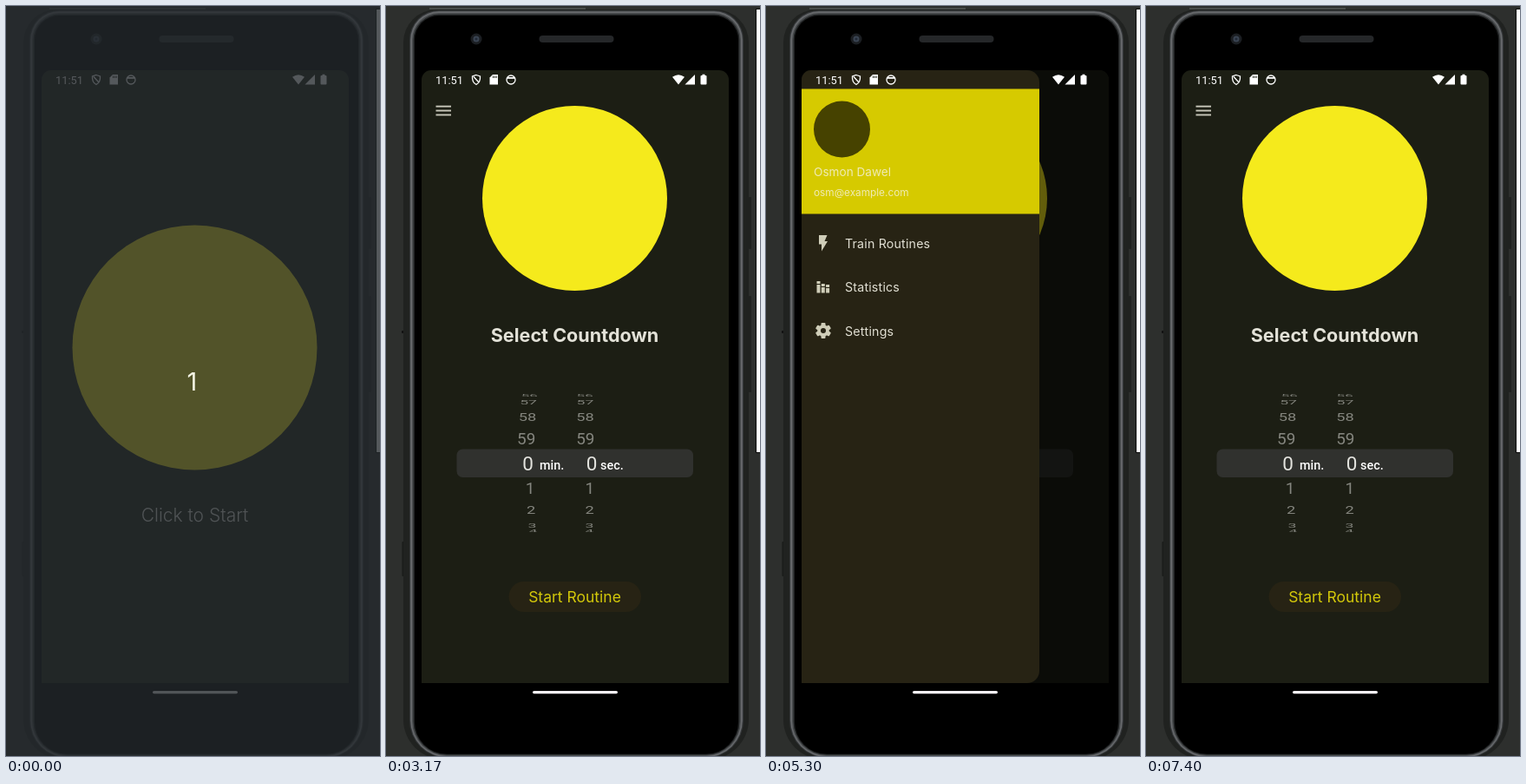
These frames come from a looping animation (431 px wide and 864 px high, 8000 ms). An HTML page with a canvas:

```html
<!DOCTYPE html>
<html lang="en">
<head>
<meta charset="utf-8">
<title>Countdown app</title>
<style>
  html, body { margin: 0; width: 100%; height: 100%; overflow: hidden; background: #2d2f2d; }
  canvas { display: block; width: 431px; height: 864px; }
</style>
</head>
<body>
<canvas id="stage" width="431" height="864"></canvas>
<script>
const ctx = document.getElementById('stage').getContext('2d');
const LOOP = 8000;
const SCREEN = { x: 41, y: 74, w: 354, h: 706 };
const DRAWER_W = 274;
const BG = '#1c1e14', SURFACE = '#272314', LOGO = '#f5ea1c', ICON = '#cfcdb8';

const mix = (a, b, k) => a + (b - a) * k;
const clamp = v => Math.max(0, Math.min(1, v));
const easeOut = (k, power) => 1 - Math.pow(1 - k, power);

// Progress from 0 to 1 in a fixed number of pictures.
function stepped(t, start, end, count) {
  const k = clamp((t - start) / (end - start));
  return Math.floor(k * (count - 1) + 1e-6) / (count - 1);
}

function rect(x, y, w, h, color) {
  ctx.fillStyle = color;
  ctx.fillRect(x, y, w, h);
}

function round(x, y, w, h, r, fill) {
  ctx.beginPath();
  ctx.roundRect(x, y, w, h, r);
  ctx.fillStyle = fill;
  ctx.fill();
}

function disc(x, y, r, color) {
  ctx.beginPath();
  ctx.arc(x, y, r, 0, Math.PI * 2);
  ctx.fillStyle = color;
  ctx.fill();
}

function poly(color, ...points) {
  ctx.beginPath();
  for (let i = 0; i < points.length; i += 2) ctx.lineTo(points[i], points[i + 1]);
  ctx.closePath();
  ctx.fillStyle = color;
  ctx.fill();
}

function label(text, x, y, font, color, align = 'left', spacing = 0) {
  ctx.font = font;
  ctx.fillStyle = color;
  ctx.textAlign = align;
  ctx.letterSpacing = spacing + 'px';
  ctx.fillText(text, x, y);
}

const inter = (size, weight = 400) => `${weight} ${size}px Inter, sans-serif`;
const roboto = (size, weight = 400) => `${weight} ${size}px Roboto, sans-serif`;

// One layer of the metal rim, measured inwards from its outer edge.
function rim(inset, color) {
  const top = Math.max(0, 34 - inset), bottom = 43 - inset;
  round(27 + inset, 5 + inset, 385 - 2 * inset, 861 - 1.7 * inset,
    [top, top, bottom, bottom], color);
}

function drawPhone() {
  rect(0, 0, 431, 864, '#2d2f2d');
  rect(50, 2, 180, 2, '#4a4d4b');

  // Side buttons
  round(18, 374, 3, 3, 1, '#111');
  round(18.5, 617, 3, 40, 1, '#1a1c1a');
  round(418, 220, 3, 60, 1, '#202220');
  round(418, 334, 3, 111, 1, '#202220');

  round(20, 4, 398, 864, [38, 38, 46, 46], '#202220');
  rim(0, '#35383a');
  rim(1.2, '#67696c');
  rim(3, '#494c4e');
  rim(4.5, '#222425');
  rim(6, '#000');

  disc(104, 38, 6.5, '#1b1e22');
  disc(104, 38, 3.5, '#3a4452');
  disc(104, 38, 1.5, '#222a36');
  round(176.5, 34, 86, 8, 4, '#252729');

  round(169, 789, 98, 3.2, 1.6, '#f4f0f4');

  // Neighbouring window
  rect(426, 3, 5, 512, '#0b0c0b');
  rect(427, 4, 4, 510, '#fff');
}

function drawStatusBar() {
  label('11:51', 57, 90, roboto(12.8), '#fff');
  ctx.strokeStyle = '#fff';
  ctx.lineWidth = 1.3;

  // Shield
  ctx.beginPath();
  ctx.moveTo(104, 79.5);
  ctx.lineTo(108.5, 81);
  ctx.quadraticCurveTo(109, 88, 104, 90.5);
  ctx.quadraticCurveTo(99, 88, 99.5, 81);
  ctx.closePath();
  ctx.moveTo(101, 81.5);
  ctx.lineTo(107, 88);
  ctx.stroke();

  // Memory card
  poly('#fff', 123, 79, 129, 79, 129, 90.5, 119.5, 90.5, 119.5, 82.5);
  for (let i = 0; i < 3; i++) rect(123 + i * 1.9, 80.5, 0.9, 2.5, BG);

  // Round notice
  ctx.beginPath();
  ctx.arc(144, 85, 5, 0, Math.PI * 2);
  ctx.stroke();
  rect(140, 82, 8, 1.8, '#fff');

  // Wi-Fi, signal, battery
  ctx.beginPath();
  ctx.moveTo(337, 90.5);
  ctx.lineTo(330, 81.8);
  ctx.quadraticCurveTo(337, 76.5, 344, 81.8);
  ctx.closePath();
  ctx.fillStyle = '#fff';
  ctx.fill();
  poly('#fff', 356, 79, 356, 90.5, 344.5, 90.5);
  round(362.5, 80, 7, 10.5, 1, '#fff');
  rect(364.5, 78.7, 3, 2, '#fff');
}

function drawSplash() {
  disc(217.5, 393.5, 141, LOGO);
  label('Click to Start', 217.5, 594, inter(21, 300), '#e8e8e2', 'center');
}

// Digits lie on a cylinder.
function drawWheel(x2, x0, x1, drift) {
  for (let i = -4; i <= 4; i++) {
    const n = Math.abs(i), angle = i * 0.375;
    const x = i === 0 ? x0 : i < 0 ? x2 + drift * n : x1 + drift * n;
    ctx.save();
    ctx.translate(x, 527 + 78.5 * Math.sin(angle));
    ctx.scale(1, Math.max(0.17, Math.cos(angle)));
    const size = i === 0 ? 22.5 : 19.5 - n * 0.6;
    label(String((i + 60) % 60), 0, size * 0.36, roboto(size),
      i === 0 ? '#e4e4df' : '#85867f', 'center');
    ctx.restore();
  }
}

function drawHome(k) {
  const scale = mix(0.986, 1, k);
  ctx.save();
  ctx.translate(217.5, 427);
  ctx.scale(scale, scale);
  ctx.translate(-217.5, -427);

  rect(SCREEN.x, SCREEN.y, SCREEN.w, SCREEN.h, BG);
  for (let i = 0; i < 3; i++) rect(57.5, 114.7 + i * 4.9, 17.5, 1.9, '#c8c7ba');

  disc(217.5, mix(274, 221.5, k), mix(111.5, 106.5, k), LOGO);
  label('Select Countdown', 217.5, 387, inter(21.6, 700), '#e3e2d8', 'center');

  round(81.5, 510.5, 272.5, 32.5, 7, '#30312e');
  drawWheel(160.5, 163.5, 164.8, 1.2);
  drawWheel(230, 237, 235, -0.2);
  label('min.', 177, 533.5, roboto(14.4, 500), '#fff');
  label('sec.', 247, 533.5, roboto(14.4, 500), '#fff');

  round(141.5, 663, 152.5, 35, 17.5, '#272314');
  label('Start Routine', 217.5, 687, inter(17.5), '#d3c80a', 'center');
  ctx.restore();
}

function drawMenuIcons() {
  poly(ICON, 61, 264, 70.5, 264, 67.5, 271, 71, 271, 64, 282.5, 64, 274.5, 61, 274.5);

  rect(58.5, 317, 4, 3, ICON);
  rect(58.5, 321, 4, 9.5, ICON);
  rect(63.8, 320, 4, 3, ICON);
  rect(63.8, 324, 4, 6.5, ICON);
  rect(69.1, 321, 4, 3, ICON);
  rect(69.1, 325, 4, 5.5, ICON);

  for (let i = 0; i < 6; i++) {
    ctx.save();
    ctx.translate(66, 374);
    ctx.rotate(i * Math.PI / 3);
    round(-2.5, -9, 5, 6, 1, ICON);
    ctx.restore();
  }
  disc(66, 374, 6.8, ICON);
  disc(66, 374, 3, SURFACE);
}

function drawDrawer(open, press) {
  if (open <= 0) return;
  rect(SCREEN.x, SCREEN.y, SCREEN.w, SCREEN.h, `rgba(0,0,0,${0.6 * open})`);

  ctx.save();
  ctx.translate(-DRAWER_W * (1 - open), 0);
  ctx.beginPath();
  ctx.roundRect(SCREEN.x, SCREEN.y, DRAWER_W, SCREEN.h, [0, 14, 14, 0]);
  ctx.clip();
  rect(SCREEN.x, SCREEN.y, DRAWER_W, SCREEN.h, SURFACE);
  rect(SCREEN.x, 95.5, DRAWER_W, 144, '#d6ca00');

  disc(87.5, 142, 32.5, '#464200');
  label('Osmon Dawel', 55, 196, inter(13.6), '#efeab4');
  label('osm@example.com', 55, 219, inter(11.8), '#efeab4');

  if (press > 0) rect(SCREEN.x, 248, DRAWER_W, 50, `rgba(255,250,215,${press})`);
  drawMenuIcons();
  ['Train Routines', 'Statistics', 'Settings'].forEach((text, i) =>
    label(text, 91, 278.5 + i * 50.5, inter(14.2), '#e2e0d4', 'left', 0.2));
  ctx.restore();
}

function drawerAmount(t) {
  if (t < 5030) return 0;
  if (t < 7130) return 1 - 0.675 * Math.pow(1 - stepped(t, 5030, 5300, 9), 2.2);
  return 1 - easeOut(stepped(t, 7130, 7400, 9), 2.2);
}

function drawScreen(t) {
  ctx.save();
  ctx.beginPath();
  ctx.roundRect(SCREEN.x, SCREEN.y, SCREEN.w, SCREEN.h, [11, 11, 0, 0]);
  ctx.clip();
  if (t < 2970) {
    rect(SCREEN.x, SCREEN.y, SCREEN.w, SCREEN.h, BG);
    drawSplash();
  } else {
    const k = t < 3030 ? 0 : easeOut(stepped(t, 2970, 3170, 6), 2);
    drawHome(k);
    const press = t < 7070 ? 0 : 0.045 + 0.05 * clamp((t - 7070) / 150);
    drawDrawer(drawerAmount(t), press);
  }
  drawStatusBar();
  ctx.restore();
}

function draw(t) {
  drawPhone();
  drawScreen(t);
  if (t < 30) {
    rect(0, 0, 431, 864, 'rgba(36,41,46,0.78)');
    label('1', 214.5, 443, inter(29), '#f2f2e2', 'center');
  }
}

function tick() {
  draw(performance.now() % LOOP);
  requestAnimationFrame(tick);
}
tick();
</script>
</body>
</html>
```
